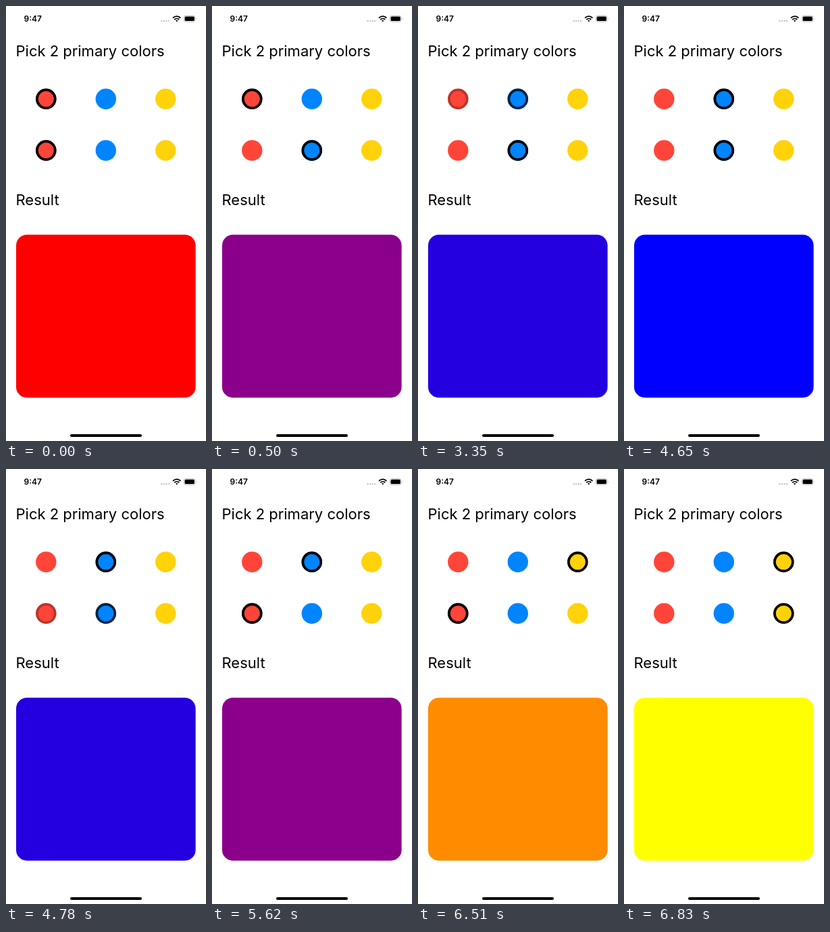
Write an HTML page that moves like this. It is 296 px wide and 640 px high and loops after 8000 ms.

```html
<!DOCTYPE html>
<html lang="en">
<head>
<meta charset="utf-8">
<title>Color mixer</title>
<style>
  html, body { margin: 0; width: 100%; height: 100%; overflow: hidden; background: #fff; }
  svg { display: block; width: 296px; height: 640px; }
  text { font: 400 22px Inter, "Liberation Sans", sans-serif; }
  .clock { font-size: 12px; font-weight: 600; }
</style>
</head>
<body>
<svg id="stage" viewBox="0 0 296 640">
  <text class="clock" x="26.5" y="23">9:47</text>
  <g fill="#c4c4c6">
    <circle cx="230.5" cy="22" r="1.2"/><circle cx="234" cy="22" r="1.2"/>
    <circle cx="237.5" cy="22" r="1.2"/><circle cx="241" cy="22" r="1.2"/>
  </g>
  <g fill="none" stroke="#000" stroke-width="1.8">
    <path d="M247 17.6a8 8 0 0 1 11.4 0M249.2 20a5 5 0 0 1 7 0"/>
    <path d="M252.7 23.3l-1.7-1.8a2.6 2.6 0 0 1 3.4 0z" fill="#000" stroke="none"/>
  </g>
  <rect x="263.4" y="14.4" width="16.6" height="8.8" rx="2.6" fill="none" stroke="#a6a6a6" stroke-width=".8"/>
  <rect x="264.6" y="15.6" width="14.2" height="6.4" rx="1.5"/>
  <path d="M281 17.3q1.3 1.5 0 3z" fill="#a6a6a6"/>
  <text x="14.5" y="74">Pick 2 primary colors</text>
  <text x="14.5" y="292.5">Result</text>
  <rect id="result" x="15" y="336.5" width="265.6" height="239.7" rx="15.8"/>
  <rect x="95" y="630" width="106" height="4" rx="2"/>
</svg>
<script>
const LOOP = 8000;
const RED = 0, BLUE = 1, YELLOW = 2;
const swatches = ['#ff4539', '#0085ff', '#ffd20a'];
const red = [255, 0, 0], blue = [0, 0, 255], yellow = [255, 255, 0];
const purple = [139, 0, 139], orange = [255, 140, 0];

// Selected swatch per row, mixed color, and the times of the fade steps
const states = [
  { picks: [RED, RED], color: red, steps: [0] },
  { picks: [RED, BLUE], color: purple, steps: [500] },
  { picks: [BLUE, BLUE], color: blue, steps: [3140, 3240, 3350, 3460] },
  { picks: [BLUE, RED], color: purple, steps: [4650, 4780, 4880, 4980] },
  { picks: [YELLOW, RED], color: orange, steps: [5620, 5740, 5845, 5950] },
  { picks: [YELLOW, YELLOW], color: yellow, steps: [6510, 6620, 6725, 6830] }
];

const stage = document.getElementById('stage');
const result = document.getElementById('result');

function addCircle(attrs) {
  const node = document.createElementNS('http://www.w3.org/2000/svg', 'circle');
  for (const key in attrs) node.setAttribute(key, attrs[key]);
  return stage.appendChild(node);
}

const rings = [136.8, 212.5].map(cy => swatches.map((fill, i) => {
  const cx = 59.3 + 88.5 * i;
  addCircle({ cx, cy, r: 15.2, fill });
  return addCircle({ cx, cy, r: 13.4, fill: 'none', stroke: '#000', 'stroke-width': 3.8 });
}));

const ease = p => p * p * (3 - 2 * p);
const mix = (a, b, p) => a + (b - a) * p;

function draw(time) {
  const index = states.findLastIndex(s => time >= s.steps[0]);
  const next = states[index], prev = states[Math.max(0, index - 1)];
  const last = next.steps.length - 1;
  const step = next.steps.findLastIndex(at => time >= at);
  const p = last ? ease(step / last) : 1;

  rings.forEach((row, r) => row.forEach((ring, i) => {
    ring.setAttribute('stroke-opacity', mix(+(prev.picks[r] === i), +(next.picks[r] === i), p));
  }));
  const rgb = next.color.map((c, i) => Math.round(mix(prev.color[i], c, p)));
  result.setAttribute('fill', `rgb(${rgb})`);
}

const start = performance.now();
function tick() {
  draw((performance.now() - start) % LOOP);
  requestAnimationFrame(tick);
}
tick();
</script>
</body>
</html>
```
